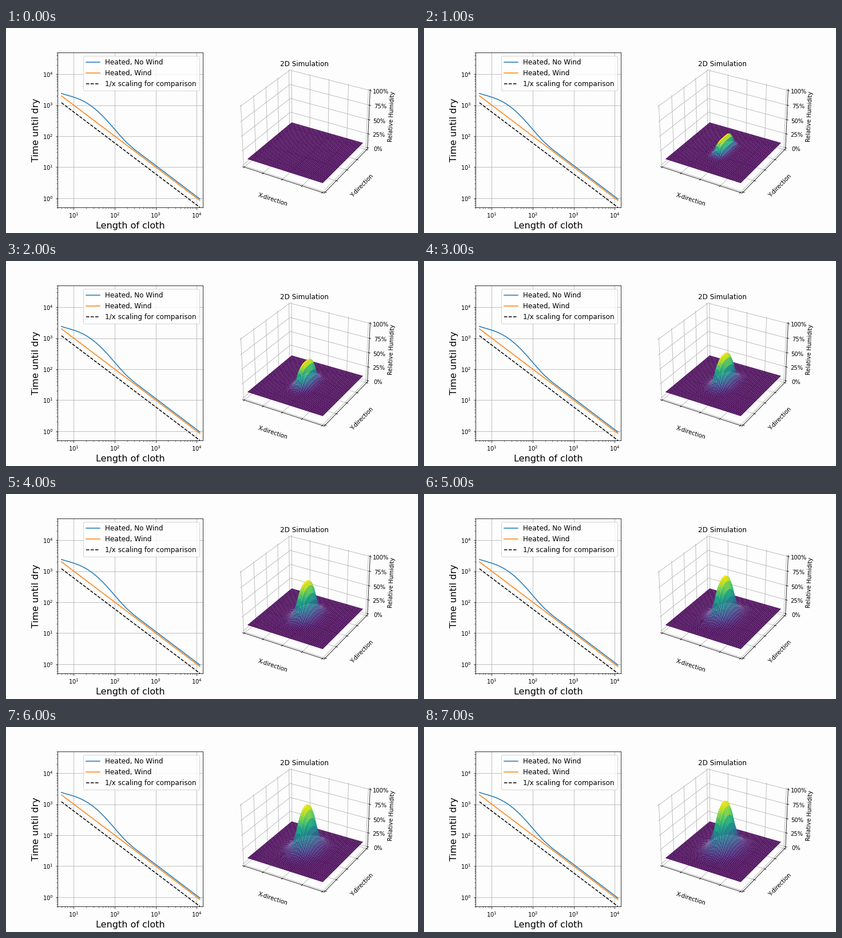
A matplotlib script for the animation above (8 s loop, 720 by 360 pixels).

```python
import math

import matplotlib.pyplot as plt
import numpy as np
from matplotlib.animation import FuncAnimation
from matplotlib.ticker import PercentFormatter

FRAMES = 8
BACK = "#fdfdfd"
AMBIENT = 0.1
HALF_X, HALF_Y = 0.041, 0.173   # half size of the wet strip
SPREAD = 0.0729                 # diffusion length after one time unit
RATE = 0.3215                   # moisture released per time unit
STEPS = 60

plt.rcParams.update({"font.family": "DejaVu Sans", "font.size": 10})
erf = np.vectorize(math.erf)
grid = np.linspace(-0.5, 0.5, 50)
X, Y = np.meshgrid(grid, grid)


def smeared_box(pos, half, width):
    """Box of the given half size blurred by diffusion."""
    return 0.5 * (erf((pos + half) / width) - erf((pos - half) / width))


def humidity(t):
    """Diffusion from a strip that releases moisture at a constant rate."""
    z = np.full_like(X, AMBIENT)
    if t == 0:
        return z
    for v in (np.arange(STEPS) + 0.5) / STEPS:
        width = SPREAD * v * math.sqrt(t)
        weight = 2 * v * t / STEPS
        z += RATE * weight * np.outer(smeared_box(grid, HALF_Y, width),
                                      smeared_box(grid, HALF_X, width))
    return z


def no_wind_curve():
    """Smooth bend for short cloths, then a straight power law."""
    xs = np.log10([5, 10, 20, 32, 56, 100, 140, 200])
    ys = np.log10([2400, 1810, 1210, 785, 390, 163, 101, 60])
    fit = np.polyfit(xs, ys, 4)
    lx = np.linspace(xs[0], xs[-1], 80)
    x = np.append(10 ** lx, [300, 12000])
    y = np.append(10 ** np.polyval(fit, lx), [37.6, 0.935])
    return x, y


def draw_chart(ax):
    ends = np.array([5, 12000])
    ax.set_facecolor(BACK)
    ax.loglog(*no_wind_curve(), label="Heated, No Wind")
    ax.loglog(ends, 1e4 / ends, label="Heated, Wind")
    ax.loglog(ends, 6e3 / ends, "k--", label="1/x scaling for comparison")
    ax.set_xlim(4, 1.4e4)
    ax.set_ylim(0.5, 5e4)
    ax.set_xlabel("Length of cloth", fontsize=16)
    ax.set_ylabel("Time until dry", fontsize=16)
    ax.grid(True)
    ax.legend(loc="upper right", fontsize=12)


def setup_scene(ax):
    edge = 0.5 * (25 / 24) ** 2
    ticks = np.linspace(-0.52, 0.52, 5)
    ax.set_facecolor(BACK)
    ax.set_xlim(-edge, edge)
    ax.set_ylim(-edge, edge)
    ax.set_zlim(-1 / 48, 49 / 48)
    ax.set_xticks(ticks, labels=[""] * 5)
    ax.set_yticks(ticks, labels=[""] * 5)
    ax.set_zticks(np.linspace(0, 1, 5))
    ax.zaxis.set_major_formatter(PercentFormatter(1, decimals=0))
    for axis in (ax.xaxis, ax.yaxis, ax.zaxis):
        axis.set_pane_color((1, 1, 1, 0))
    ax.set_xlabel("X-direction")
    ax.set_ylabel("Y-direction")
    ax.set_zlabel("Relative Humidity")
    ax.set_title("2D Simulation", y=1)


fig = plt.figure(figsize=(10, 5), dpi=72, facecolor=BACK)
fig.subplots_adjust(left=0.125, right=0.9, bottom=0.125, top=0.88, wspace=0.2)
chart = fig.add_subplot(1, 2, 1)
scene = fig.add_subplot(1, 2, 2, projection="3d")
draw_chart(chart)
setup_scene(scene)


def update(step):
    for old in list(scene.collections):
        old.remove()
    surface = scene.plot_surface(X, Y, humidity(step), rstride=1, cstride=1,
                                 cmap="viridis", linewidth=0.2)
    return [surface]


anim = FuncAnimation(fig, update, frames=FRAMES, interval=1000,
                     repeat=True, repeat_delay=0, blit=False)
plt.show()
```
